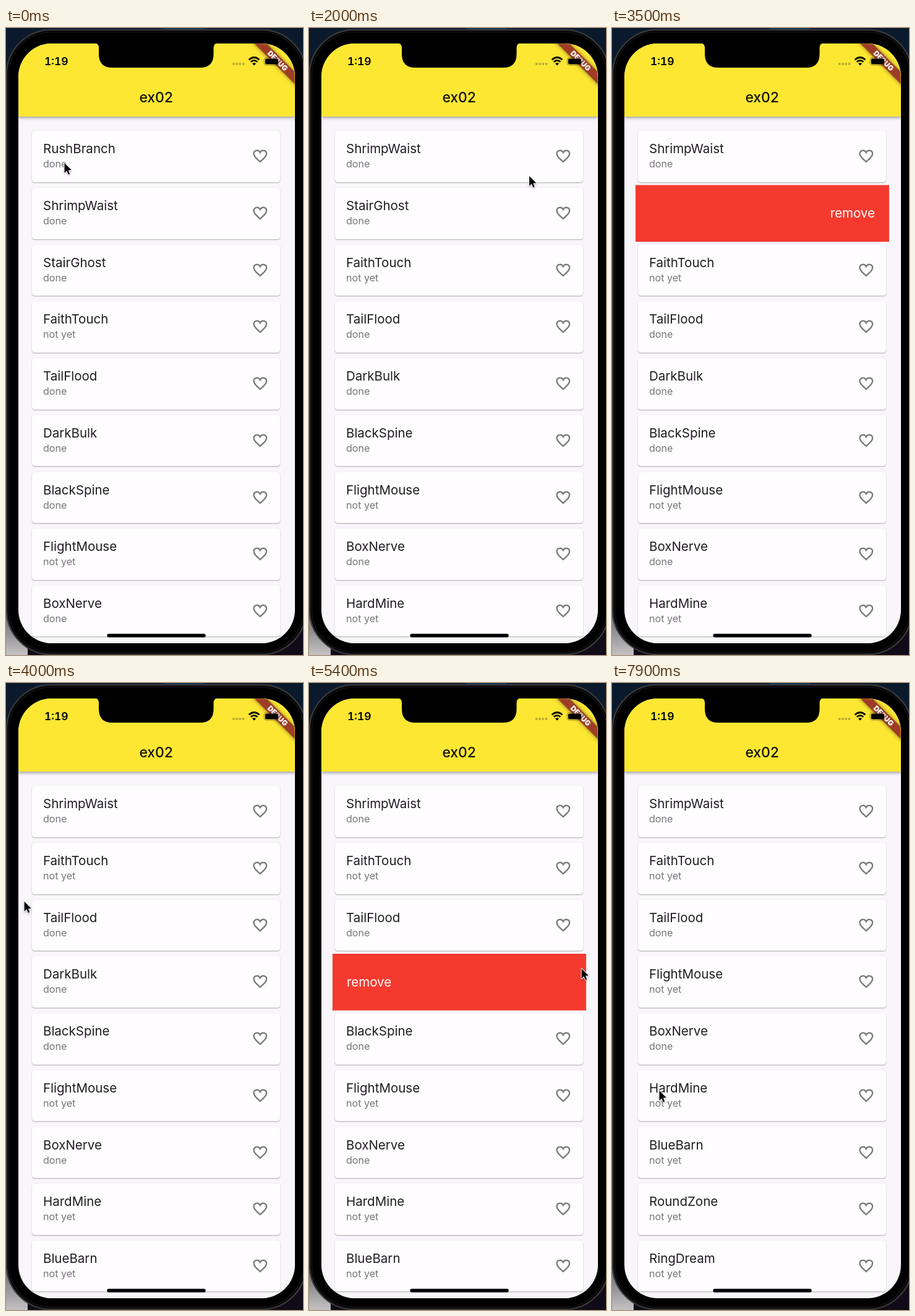
Animation of 480 by 1012 pixels, one loop 8000 ms. Source, as an HTML page:

```html
<!DOCTYPE html>
<html lang="en">
<head>
<meta charset="utf-8">
<title>ex02</title>
<style>
html, body { margin: 0; width: 100%; height: 100%; overflow: hidden; background: #0a1a2c; }
body { font-family: Inter, "Liberation Sans", sans-serif; }
#stage { position: absolute; left: 0; top: 0; width: 480px; height: 1012px; overflow: hidden; }
#stage > svg { position: absolute; left: 0; top: 0; }
#screen { position: absolute; left: 19.5px; top: 25.3px; width: 447px; height: 967.4px; border-radius: 54px; overflow: hidden; background: #f8f6fa; }
#list { position: absolute; left: 18.4px; top: 136.5px; width: 410px; }
.row { position: absolute; left: 0; width: 410px; }
.bg { position: absolute; inset: 0; display: flex; align-items: center; padding: 0 23px; background: #f43a2f; color: #fff; font-size: 20.5px; line-height: 24px; }
.card { position: absolute; left: 4.6px; top: 4.6px; width: 400.8px; height: 82.5px; border-radius: 4.6px; background: #fffdff; box-shadow: 0 1px 1.5px rgba(0,0,0,.3), 0 0 2px rgba(0,0,0,.07); overflow: hidden; }
.card div { position: absolute; left: 17.5px; white-space: nowrap; }
.name { top: 17px; font-size: 20.5px; line-height: 24px; color: #1f1d21; }
.state { top: 43px; font-size: 16.1px; line-height: 20px; color: #757478; }
.card svg { position: absolute; left: 355px; top: 27px; fill: none; stroke: #79777b; stroke-width: 2; }
.card .ink { left: 0; top: -42px; width: 160px; height: 160px; border-radius: 50%; background: #000; }
#bar { position: absolute; left: 0; top: 0; width: 447px; height: 118px; background: #fde733; box-shadow: 0 2px 5px rgba(0,0,0,.38); }
</style>
</head>
<body>
<div id="stage">
  <svg width="480" height="1012">
    <defs>
      <linearGradient id="corner" x1="0" y1="0" x2="0" y2="1">
        <stop offset="0" stop-color="#55555a"/><stop offset="1" stop-color="#c4c2c3"/>
      </linearGradient>
    </defs>
    <rect width="480" height="1012" fill="#0a1a2c"/>
    <rect x="255" width="65" height="3" fill="#123b5c"/>
    <rect y="930" width="35" height="82" fill="url(#corner)"/>
    <rect x="35" y="960" width="445" height="52" fill="#110a18"/>
    <rect x="1" y="3" width="484" height="1008" rx="72" stroke="#37373a" stroke-width="2.5"/>
    <rect x="4.5" y="6.5" width="477" height="1001" rx="69" stroke="#161618" stroke-width="1.5"/>
  </svg>
  <div id="screen">
    <div id="list"></div>
    <div id="bar"></div>
  </div>
  <svg width="480" height="1012">
    <defs><clipPath id="glass"><rect x="19.5" y="25.3" width="447" height="967.4" rx="54"/></clipPath></defs>
    <text x="242.7" y="119.5" text-anchor="middle" font-size="22.9" font-weight="500" fill="#141306">ex02</text>
    <g clip-path="url(#glass)">
      <g transform="translate(466.5 25.3) rotate(45)">
        <rect x="-70" y="32.1" width="140" height="13.7" fill="#9e3d25" style="filter:drop-shadow(0 0 3px rgba(0,0,0,.5))"/>
        <text y="43.1" text-anchor="middle" font-size="11.7" font-weight="900" fill="#fff">DEBUG</text>
      </g>
    </g>
    <path d="M143 24Q150 25 150 32V42Q150 64 172 64H313.5Q335.5 64 335.5 42V32Q335.5 25 342.5 24Z"/>
    <text x="62" y="60.2" font-size="17.5" font-weight="600" style="font-variant-numeric:tabular-nums">1:19</text>
    <path d="M367.7 58H384" fill="none" stroke="#b9a935" stroke-width="4" stroke-linecap="round" stroke-dasharray="0 5.27"/>
    <g fill="none" stroke="#000" stroke-width="2.8">
      <path d="M392.6 51.3Q401 43.7 409.4 51.3"/>
      <path d="M395.7 54.8Q401 50 406.3 54.8"/>
    </g>
    <path d="M398 57.4Q401 55 404 57.4L401 60.4Z"/>
    <rect x="417" y="48" width="24.5" height="12" rx="3.8" fill="none" stroke="#000" stroke-opacity=".4"/>
    <rect x="418.7" y="49.5" width="21.2" height="9" rx="2.3"/>
    <path d="M443 52Q445 54 443 56Z" fill-opacity=".5"/>
    <rect x="163.3" y="977.7" width="159.4" height="5.7" rx="2.85"/>
    <path id="cursor" d="M.5 1V17L4.2 13.6L6.8 19.4L9.2 18.4L6.8 12.6L11.8 12.3Z" stroke="#fff" stroke-width="2" stroke-linejoin="round" paint-order="stroke" style="filter:drop-shadow(0 1px 1px rgba(0,0,0,.3))"/>
  </svg>
</div>
<script>
const LOOP = 8000, STEP = 100, ROW = 91.7, WIDTH = 410;
const FLY = 150, PAUSE = 120, SHRINK = 180, INK = 400;

const done = 'RushBranch ShrimpWaist StairGhost TailFlood DarkBulk BlackSpine BoxNerve'.split(' ');
const names = ('RushBranch ShrimpWaist StairGhost FaithTouch TailFlood DarkBulk BlackSpine ' +
  'FlightMouse BoxNerve HardMine BlueBarn RoundZone RingDream').split(' ');

// The pointer waits at `from` since `ready`, drags to `to` and lets go; `slop` is travel the card ignores.
const swipes = [
  { name: 'RushBranch', ready: 0, start: 600, ms: 700, release: 1300, from: [94, 217], to: [362, 220], slop: 20 },
  { name: 'StairGhost', ready: 2500, start: 2500, ms: 580, release: 3290, from: [337, 289], to: [-20, 295], slop: 36 },
  { name: 'DarkBulk', ready: 4400, start: 4400, ms: 645, release: 5150, from: [123, 460], to: [440, 460], slop: 18 },
  { name: 'BlackSpine', ready: 5800, start: 6200, ms: 460, release: 6680, from: [363, 470], to: [-20, 470], slop: 60 }
];
const rest = { ready: 7900, from: [76, 657] };

const clamp = v => Math.max(0, Math.min(1, v));
const ease = u => u * u * (3 - 2 * u);
const mix = (a, b, u) => a + (b - a) * u;
const glide = (a, b, u) => a.map((v, i) => mix(v, b[i], ease(clamp(u))));

const collapseAt = s => s.release + FLY + PAUSE;
const dragPoint = (s, t) => glide(s.from, s.to, (t - s.start) / s.ms);

function pointerAt(t) {
  const i = swipes.findLastIndex(s => t >= s.ready);
  const s = swipes[i], next = swipes[i + 1] || rest;
  const leave = collapseAt(s) + SHRINK;
  return t < leave ? dragPoint(s, t) : glide(s.to, next.from, (t - leave) / (next.ready - leave));
}

function cardOffset(s, t) {
  const travel = dragPoint(s, t)[0] - s.from[0];
  const drag = Math.max(0, Math.abs(travel) - s.slop);
  return Math.sign(travel) * mix(drag, WIDTH, clamp((t - s.release) / FLY));
}

const heart = 'M12 20C6 14.6 3 11.9 3 8.5C3 4 9.5 2 12 6.9C14.5 2 21 4 21 8.5C21 11.9 18 14.6 12 20Z';
const list = document.getElementById('list');
const cursor = document.getElementById('cursor');

const rows = names.map(name => {
  const el = document.createElement('div');
  el.className = 'row';
  el.innerHTML = `<div class="bg">remove</div><div class="card"><div class="ink"></div>
    <div class="name">${name}</div><div class="state">${done.includes(name) ? 'done' : 'not yet'}</div>
    <svg width="27.5" height="27.5" viewBox="0 0 24 24"><path d="${heart}"/></svg></div>`;
  list.append(el);
  const [bg, card, ink] = ['.bg', '.card', '.ink'].map(s => el.querySelector(s));
  return { el, bg, card, ink, swipe: swipes.find(s => s.name === name) };
});

function drawInk(el, s, t) {
  const age = s ? t - s.start : -1;
  el.style.opacity = age < 0 ? 0 : 0.022 * clamp((INK - age) / 150);
  if (s) el.style.transform = `translateX(${s.from[0] - 122.5}px) scale(${mix(0.35, 1, clamp(age / 200))})`;
}

function draw(t) {
  let top = 0;
  for (const { el, bg, card, ink, swipe } of rows) {
    const x = swipe ? cardOffset(swipe, t) : 0;
    const height = swipe ? ROW * (1 - ease(clamp((t - collapseAt(swipe)) / SHRINK))) : ROW;
    el.style.top = top + 'px';
    el.style.height = height + 'px';
    el.style.display = height > 0 ? 'block' : 'none';
    bg.style.visibility = x ? 'visible' : 'hidden';
    bg.style.justifyContent = x < 0 ? 'flex-end' : 'flex-start';
    bg.style.clipPath = x < 0 ? `inset(0 0 0 ${WIDTH + x}px)` : `inset(0 ${WIDTH - x}px 0 0)`;
    card.style.visibility = Math.abs(x) < WIDTH ? 'visible' : 'hidden';
    card.style.transform = `translateX(${x}px)`;
    drawInk(ink, swipe, t);
    top += height;
  }
  cursor.setAttribute('transform', `translate(${pointerAt(t).join(' ')})`);
}

const begin = performance.now();
function tick() {
  const t = (performance.now() - begin) % LOOP;
  draw(Math.floor(t / STEP) * STEP);
  requestAnimationFrame(tick);
}
tick();
</script>
</body>
</html>
```
